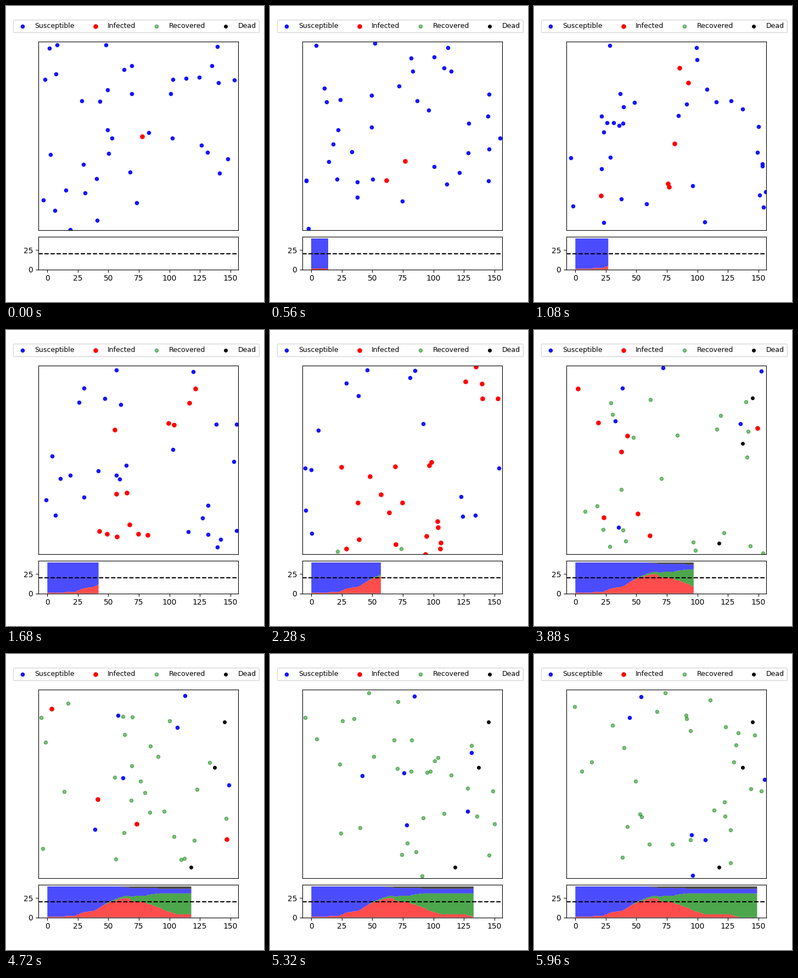
Animation of 470x540 px, one loop 6000 ms. Source, as a matplotlib script:

```python
import numpy as np
import matplotlib.pyplot as plt
from matplotlib.animation import FuncAnimation

STEPS, PEOPLE = 150, 40
SUS, INF, REC, DEAD = range(4)

LOW, HIGH = np.array([58.75, 64.8]), np.array([423, 409.32])

# Key points (step, people) of all cases so far and of all recoveries.
CASES = [(13, 1), (14, 2), (22, 2), (27, 6), (38, 9), (49, 20),
         (57, 25), (63, 29), (79, 30), (92, 34)]
HEALED = [(43, 0), (57, 2), (66, 3), (72, 8), (79, 8), (81, 11),
          (97, 23), (106, 27), (125, 27), (134, 31)]

FRAIL = [1, 2, 3]
DEATH_STEP = [60, 67, 90]
DEATH_SPOT = [(398, 124), (337, 389), (380, 207)]

# Each walk is a straight line through an anchor, reflected by the walls.
rng = np.random.default_rng(11)
anchor = rng.uniform(LOW, HIGH, (PEOPLE, 2))
angle = rng.uniform(0, 2 * np.pi, PEOPLE)
speed = rng.uniform(3, 8, PEOPLE)
velocity = np.column_stack([np.cos(angle), np.sin(angle)]) * speed[:, None]
anchor_step = np.zeros(PEOPLE)
last_step = np.full(PEOPLE, STEPS)

anchor[0] = 248, 238
anchor[FRAIL] = DEATH_SPOT
anchor_step[FRAIL] = last_step[FRAIL] = DEATH_STEP


def places(t):
    walked = np.minimum(t, last_step) - anchor_step
    p = anchor + velocity * walked[:, None]
    size = HIGH - LOW
    return LOW + size - np.abs(size - (p - LOW) % (2 * size))


def level(points, t):
    return round(np.interp(t, *zip(*points)))


def next_case(state, p):
    """The healthy person closest to an infected one; the frail go sooner."""
    well, ill = np.flatnonzero(state == SUS), np.flatnonzero(state == INF)
    gap = np.linalg.norm(p[well][:, None] - p[ill], axis=2).min(axis=1)
    return well[np.argmin(gap * np.where(np.isin(well, FRAIL), 0.2, 1))]


def run():
    """State of every person at every step."""
    state, order, log = np.full(PEOPLE, SUS), [0], []
    state[0] = INF
    for t in range(STEPS):
        p = places(t)
        while len(order) < level(CASES, t):
            who = next_case(state, p)
            state[who] = INF
            order.append(who)
        while (state == REC).sum() < level(HEALED, t):
            who = next(i for i in order if state[i] == INF and i not in FRAIL)
            state[who] = REC
        state[t >= last_step] = DEAD
        log.append(state.copy())
    return np.array(log)


STATES = run()
COUNTS = np.array([(STATES == k).sum(axis=1) for k in (INF, REC, SUS, DEAD)])
# The chart runs one step behind the room.
COUNTS = np.column_stack([COUNTS[:, 0], COUNTS[:, :-1]])

fig = plt.figure(figsize=(4.7, 5.4), dpi=100)
grid = fig.add_gridspec(6, 1)
room = fig.add_subplot(grid[:5])
chart = fig.add_subplot(grid[5])

room.set(xlim=(LOW[0], HIGH[0]), ylim=(HIGH[1], LOW[1]), xticks=[], yticks=[])
chart.set(xticks=range(0, 151, 25), yticks=[0, 25])
chart.axhline(20, color="black", ls="--", lw=1.5, zorder=3)

STYLE = [("Susceptible", "blue", 20, 0.9, 1.2), ("Infected", "red", 27, 1, 1.3),
         ("Recovered", "green", 20, 0.5, 1.1), ("Dead", "black", 16, 1, 1.4)]
dots = [room.scatter([], [], s=s, color=c, alpha=a, label=name, zorder=z)
        for name, c, s, a, z in STYLE]
room.legend(ncol=4, fontsize=9, loc="upper left", borderaxespad=0,
            bbox_to_anchor=(12.6 / 470, 1 - 25 / 540),
            bbox_transform=fig.transFigure)

layers = []


def draw(t):
    p = places(t)
    for k, dot in enumerate(dots):
        dot.set_offsets(p[STATES[t] == k])
    while layers:
        layers.pop().remove()
    if t:
        layers.extend(chart.stackplot(
            np.arange(t + 1), COUNTS[:, :t + 1], alpha=0.7, lw=0,
            colors=["red", "green", "blue", "black"]))
    chart.set(xlim=(-7.45, 156.45), ylim=(0, 42))
    return dots + layers


anim = FuncAnimation(fig, draw, frames=STEPS, interval=40,
                     init_func=lambda: draw(0), repeat=True, repeat_delay=0)
plt.show()
```
